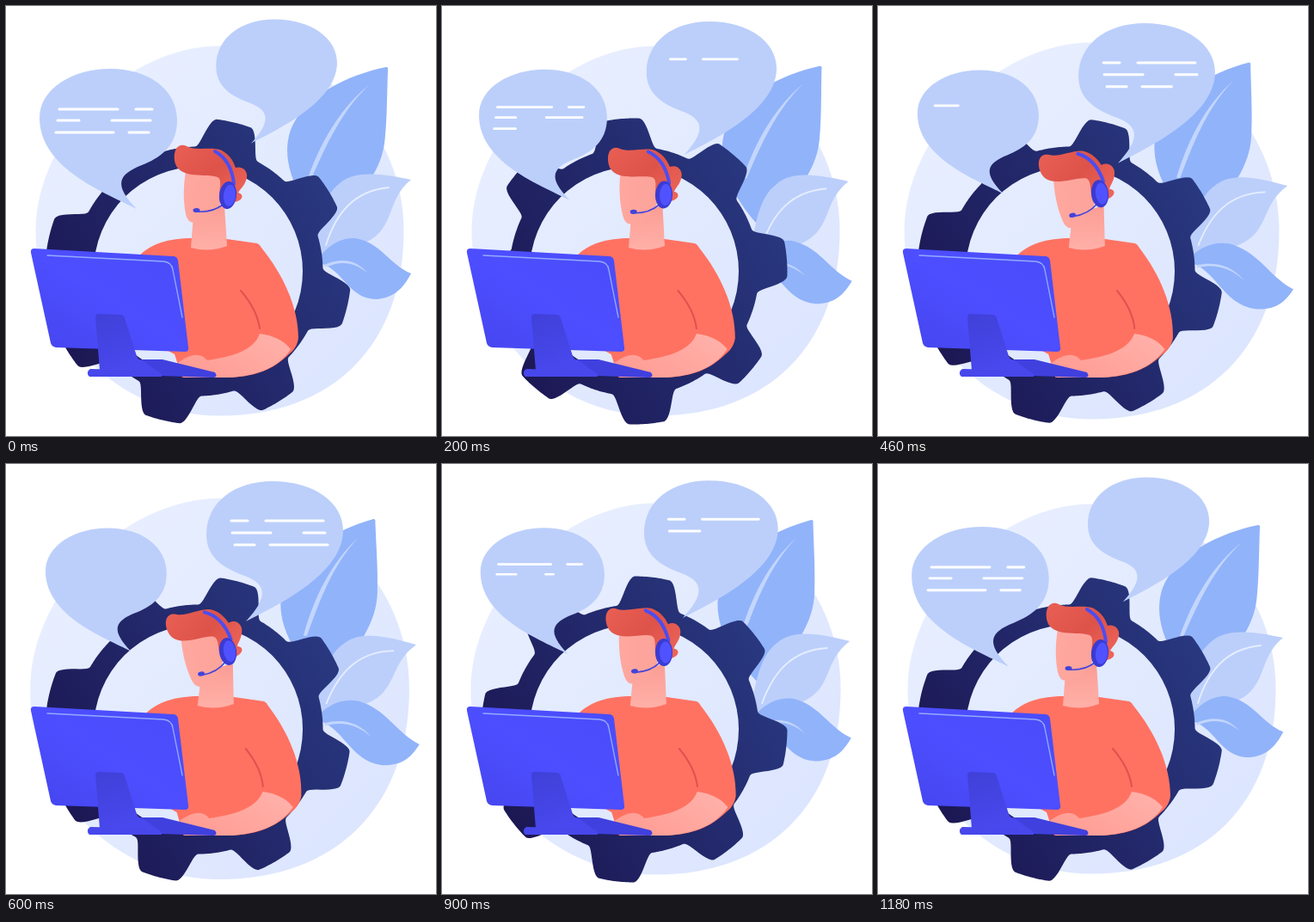
An HTML page that plays this animation: 500x500 px, repeating every 1200 ms.

```html
<!DOCTYPE html>
<html lang="en">
<head>
<meta charset="utf-8">
<title>Support agent</title>
<style>
  html, body { margin: 0; width: 100%; height: 100%; overflow: hidden; background: #fff; }
  svg { display: block; width: 100%; height: 100%; }
  .line { fill: none; stroke-linecap: round; }
  .text { stroke: #fff; stroke-width: 3; }
</style>
</head>
<body>
<svg viewBox="0 0 500 500">
  <defs>
    <linearGradient id="sky" x1="0" y1="0" x2="1" y2="1">
      <stop stop-color="#eaf0ff"/><stop offset="1" stop-color="#dae4fe"/>
    </linearGradient>
    <linearGradient id="navy" gradientUnits="userSpaceOnUse" x1="70" y1="390" x2="380" y2="220">
      <stop stop-color="#1c1854"/><stop offset="1" stop-color="#293880"/>
    </linearGradient>
    <linearGradient id="skin" x1="0" y1="0" x2="1" y2=".2">
      <stop stop-color="#ffa89f"/><stop offset="1" stop-color="#fca39a"/>
    </linearGradient>
    <linearGradient id="neckSkin" x1="0" y1="0" x2="0" y2="1">
      <stop stop-color="#fb9d94"/><stop offset="1" stop-color="#ffb0a8"/>
    </linearGradient>
    <linearGradient id="armSkin" x1="1" y1="0" x2="0" y2=".6">
      <stop stop-color="#ffb3ac"/><stop offset="1" stop-color="#ff9d94"/>
    </linearGradient>
    <linearGradient id="hairTone" x1="0" y1="0" x2="1" y2="1">
      <stop stop-color="#e95f54"/><stop offset=".5" stop-color="#dd5349"/><stop offset="1" stop-color="#f0675c"/>
    </linearGradient>
    <linearGradient id="screen" x1="0" y1="1" x2="1" y2="0">
      <stop stop-color="#4545ee"/><stop offset=".5" stop-color="#4d4eff"/><stop offset="1" stop-color="#4a4cf9"/>
    </linearGradient>
    <linearGradient id="standTone" x1="0" y1="0" x2=".4" y2="1">
      <stop stop-color="#4040d8"/><stop offset="1" stop-color="#4848ee"/>
    </linearGradient>
  </defs>

  <path id="disc" fill="url(#sky)" d="M-214 0C-214 -108 -108 -215 0 -215C118 -215 214 -119 214 0C214 132 132 215 0 215C-118 215 -214 119 -214 0Z"/>

  <g id="bigLeaf">
    <path fill="#91b3fa" d="M442 71Q445 71 444 75C443 105 443 130 441 150C439 185 424 206 376 264C328 214 321 172 331 144C347 104 398 80 442 71Z"/>
    <path fill="#c3d6fd" d="M423 91C391 121 373 160 355 201L351 200C366 158 389 118 423 91Z"/>
  </g>
  <g id="midLeaf">
    <path fill="#bccffb" d="M471 202C442 196 406 189 387 207C368 222 364 250 358 292L418 275C454 258 441 226 471 202Z"/>
    <path class="line" stroke="#e6eeff" stroke-width="1.8" d="M445 211C405 215 384 240 372 278"/>
  </g>
  <g id="lowLeaf">
    <path fill="#91b3fa" d="M471 311C446 301 436 275 406 270C388 269 372 280 360 298C392 302 396 341 431 341C452 339 462 328 471 311Z"/>
    <path fill="#c3d6fd" d="M420 310C406 294 389 293 370 301L371 304C389 296 404 297 420 310Z"/>
  </g>

  <path id="gear" fill="url(#navy)" fill-rule="evenodd"/>

  <g id="leftBubble">
    <path fill="#bccffb" d="M39 130C39 96 78 73 121 73C166 73 199 97 199 133C199 164 178 177 158 185C130 196 125 208 152 236C118 218 39 190 39 130Z"/>
    <path id="leftText" class="line text"/>
  </g>
  <g id="rightBubble">
    <path fill="#bccffb" d="M233 82C233 45 265 20 310 20C358 20 392 45 392 77C392 125 325 160 279 183C304 156 304 141 280 131C255 122 233 110 233 82Z"/>
    <path id="rightText" class="line text"/>
  </g>

  <g id="body">
    <path fill="#ff7262" d="M152 294C166 276 190 270 217 270L257 271L292 276Q295 277 297 281C322 312 340 350 340 386C339 394 335 400 330 404C310 424 290 430 262 432L205 432L196 405L150 380Z"/>
    <path fill="url(#neckSkin)" d="M218 242L215 281Q236 287 257 279L254 232Z"/>
    <path fill="url(#armSkin)" d="M295 381C310 383 322 388 331 399C320 416 298 431 256 432H207L197 417C215 403 226 403 234 412C262 408 288 401 295 381Z"/>
    <path class="line" stroke="#e0524f" stroke-width="2" d="M273 331C285 345 293 360 295 375"/>
  </g>

  <g id="head">
    <path fill="url(#skin)" d="M209 192C206 210 206 228 209 242Q211 253 221 252C234 250 247 240 251 225L254 195Z"/>
    <path fill="url(#hairTone)" d="M196 180C194 165 202 159 210 163C221 169 240 163 251 168C262 174 265 183 267 188C277 185 283 195 279 203C277 209 273 212 270 217C277 219 276 226 266 228L249 228C246 215 253 203 246 199C234 194 200 203 196 180Z"/>
    <path class="line" stroke="#4b4df2" stroke-width="4" d="M243 169C256 176 263 189 265 207"/>
    <path class="line" stroke="#4343dc" stroke-width="1.6" d="M252 231C243 238 234 240 222 239"/>
    <ellipse cx="221.500" cy="237.500" rx="4" ry="2.600" fill="#4343dc"/>
    <g transform="rotate(6 258 220)">
      <ellipse cx="258" cy="220" rx="10" ry="16" fill="#3b3bd2"/>
      <ellipse cx="260" cy="220" rx="7" ry="12.500" fill="#5052ff"/>
    </g>
  </g>

  <path fill="#4040df" d="M155 411H182L243 426Q247 432 240 432L180 430Z"/>
  <path fill="url(#screen)" d="M33 282L194 291Q199 291 200 296L212 397Q213 402 208 402L58 397Q53 396 52 392L29 287Q28 282 33 282Z"/>
  <path class="line" stroke="#93aaff" stroke-width="1.300" d="M48 290L183 297Q193 298 194 307L205 362"/>
  <path fill="url(#standTone)" d="M104 362Q104 358 108 358L133 359Q137 359 138 363L152 407Q154 412 160 413L175 424L109 424Z"/>
  <path fill="#4747ec" d="M98 422L174 424Q182 426 181 431H97Q92 426 98 422Z"/>
</svg>

<script>
const LOOP = 1200;
const $ = id => document.getElementById(id);
const clamp = x => Math.max(0, Math.min(1, x));
const smooth = x => x * x * (3 - 2 * x);
const ease = x => (1 - Math.cos(Math.PI * x)) / 2;
const easeOut = x => 1 - (1 - x ** 1.5) ** 4;
const move = (id, value) => $(id).setAttribute('transform', value);

// Text strokes as [x1, x2, y], in reading order
const leftLines = [[61, 131, 120], [150, 171, 120], [59, 86, 133], [122, 169, 133], [57, 126, 147], [142, 167, 147]];
const rightLines = [[261, 282, 66], [301, 370, 66], [262, 309, 80], [345, 372, 80], [265, 290, 94], [306, 375, 94]];

function typeLines(id, lines, amount) {
  let left = amount * lines.reduce((sum, [a, b]) => sum + b - a, 0);
  let d = '';
  for (const [a, b, y] of lines) {
    const length = Math.min(b - a, left);
    if (length > 2) d += `M${a + 1} ${y}h${length - 2}`;
    left -= length;
  }
  $(id).setAttribute('d', d);
}

// Eight rounded teeth around a ring
function gearPath(turn) {
  const cx = 223.5, cy = 308.5, hole = 121.5;
  const points = [];
  for (let a = 0; a < 360; a += 0.75) {
    const offset = Math.abs(a % 45 - 22.5);
    const r = 145 + 33 * smooth(clamp((15 - offset) / 8.5));
    const angle = (a - 22.5 + turn - 90) * Math.PI / 180;
    points.push((cx + r * Math.cos(angle)).toFixed(2) + ' ' + (cy + r * Math.sin(angle)).toFixed(2));
  }
  return `M${points.join('L')}ZM${cx - hole} ${cy}a${hole} ${hole} 0 1 0 ${2 * hole} 0a${hole} ${hole} 0 1 0 ${-2 * hole} 0Z`;
}

function scaleAbout(id, x, y, s) {
  move(id, `translate(${x} ${y}) scale(${s}) translate(${-x} ${-y})`);
}

function draw(now) {
  const t = now % LOOP;
  const there = Math.min(t, LOOP - t);
  const sway = ease(there / 600);
  const quick = easeOut(there / 600);
  const swell = clamp((there - 240) / 360);
  const bend = ease(t < 760 ? t / 760 : (LOOP - t) / 440);
  const droop = t < 440 ? t / 440 : (LOOP - t) / 760;

  move('disc', `translate(248.5 261.5) scale(${1 + 0.03 * swell})`);
  move('bigLeaf', `rotate(${-4.7 * bend} 340 270)`);
  move('midLeaf', `rotate(${4.4 * sway} 368 285)`);
  move('lowLeaf', `translate(368 300) matrix(${1 + 0.12 * droop} ${0.185 * droop} 0 1 0 0) translate(-368 -300)`);
  $('gear').setAttribute('d', gearPath(13.5 + 46.5 * quick));

  scaleAbout('leftBubble', 97, 85, 1 - 0.12 * quick);
  scaleAbout('rightBubble', 331, -20, 0.885 + 0.115 * quick);
  typeLines('leftText', leftLines, 1 - sway);
  typeLines('rightText', rightLines, sway);

  const lean = 0.042 * sway;
  move('body', `matrix(1 0 ${-lean} 1 ${430 * lean + 1.5 * sway} 0)`);
  move('head', `translate(0 ${-2 * sway}) rotate(${-14.4 * sway} 258 220)`);
  requestAnimationFrame(draw);
}
draw(performance.now());
</script>
</body>
</html>
```
